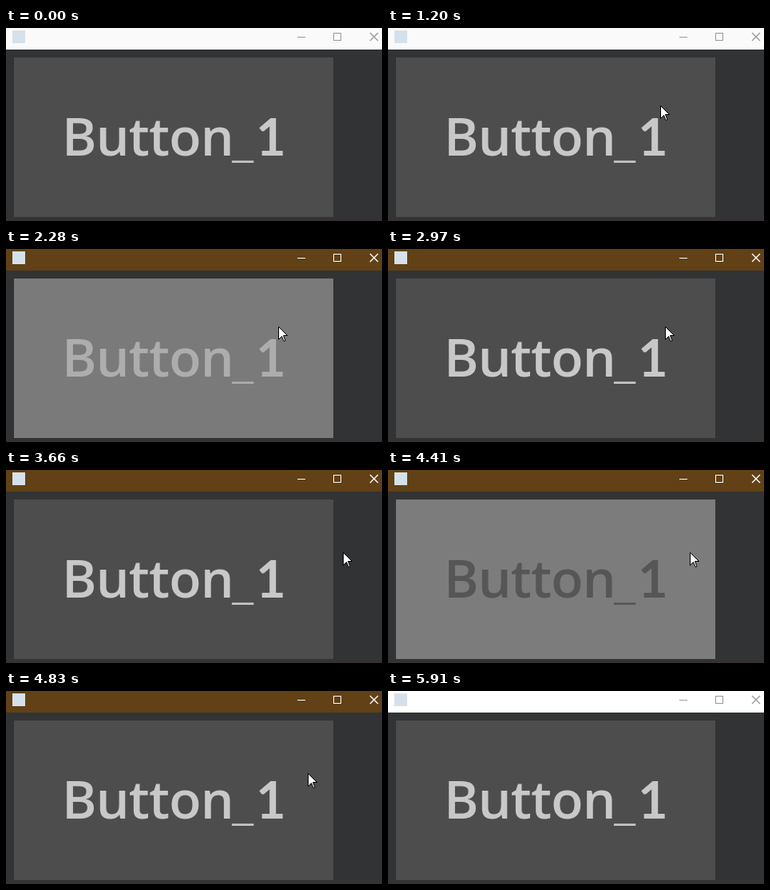
An HTML page with a canvas for the animation above (5.97 s loop, 471 by 242 pixels).

```html
<!DOCTYPE html>
<html>
<head>
<meta charset="utf-8">
<style>
  html, body { margin: 0; width: 100%; height: 100%; overflow: hidden; background: #323335; }
  canvas { display: block; }
</style>
</head>
<body>
<canvas id="stage" width="471" height="242"></canvas>
<script>
const ctx = document.getElementById('stage').getContext('2d');
const LOOP = 5970, STEP = 30;
const NORMAL = { back: 77, text: 200 };
const PRESSED = { back: 127, text: 77 };

// Progress per step towards the pressed look, and back from it
const PRESS = { back: [.6, .8, .93, 1], text: [.49, .76, .93, 1] };
const RELEASE = { back: [1, .96, .9, 0], text: [.74, .48, .22, 0] };
const FADES = [[1830, PRESS], [2220, RELEASE], [4350, PRESS], [4740, RELEASE]];

const linear = p => p;
const easeOut = p => 1 - (1 - p) ** 2;
const smooth = p => p * p * (3 - 2 * p);
const early = p => Math.min(1, p * 2.6);

// Pointer moves: start, steps, from, to, easing of x and y
const MOVES = [
  [570, 8, [465, 36], [342, 97], easeOut, easeOut],
  [1170, 1, [342, 97], [341, 97], linear, linear],
  [2940, 7, [341, 97], [453, 100], smooth, smooth],
  [3510, 13, [453, 100], [378, 103], p => p ** .92, early],
  [5280, 9, [378, 103], [474, 69], smooth, smooth]
];

const mix = (a, b, p) => a + (b - a) * p;

function shade(part, t) {
  let p = 0;
  for (const [start, fade] of FADES)
    if (t >= start) p = fade[part][Math.min(3, Math.floor((t - start) / STEP))];
  const v = Math.round(mix(NORMAL[part], PRESSED[part], p));
  return `rgb(${v},${v},${v})`;
}

function pointerAt(t) {
  let pos = null;
  for (const [start, steps, from, to, ex, ey] of MOVES) {
    if (t < start + STEP) break;
    const p = Math.min(1, Math.floor((t - start) / STEP) / steps);
    pos = [mix(from[0], to[0], ex(p)), mix(from[1], to[1], ey(p))].map(Math.round);
  }
  return pos;
}

function rect(color, x, y, w, h) {
  ctx.fillStyle = color;
  ctx.fillRect(x, y, w, h);
}

function drawTitleBar(t) {
  const active = t >= 1830 && t < 5910;
  rect(active ? '#614115' : t < 1830 ? '#fafafa' : '#fff', 0, 0, 471, 27);
  rect('#d5e1ea', 8, 3, 16, 16);
  const ink = active ? '#fff' : '#999';
  rect(ink, 365, 11, 10, 1);
  ctx.strokeStyle = ink;
  ctx.lineWidth = 1;
  ctx.strokeRect(410.5, 6.5, 9, 9);
  ctx.lineWidth = 1.4;
  ctx.beginPath();
  ctx.moveTo(456, 6);
  ctx.lineTo(466, 16);
  ctx.moveTo(466, 6);
  ctx.lineTo(456, 16);
  ctx.stroke();
}

function drawButton(t) {
  rect(shade('back', t), 10, 37, 400, 200);
  ctx.fillStyle = shade('text', t);
  const write = (font, text, x, spacing = 0) => {
    ctx.font = font;
    ctx.letterSpacing = spacing + 'px';
    ctx.fillText(text, x, 160);
  };
  write('600 66px "Open Sans", sans-serif', 'Button', 70, -.8);
  write('300 66px "Open Sans", sans-serif', '_', 283);
  write('700 65px Lato, sans-serif', '1', 313);
}

function drawPointer([x, y]) {
  const arrow = [[.5, .5], [.5, 16.5], [4.5, 12.5], [7, 18.5], [9, 18], [6.5, 11.5], [11.5, 11.5]];
  ctx.beginPath();
  for (const [dx, dy] of arrow) ctx.lineTo(x + dx, y + dy);
  ctx.closePath();
  ctx.fillStyle = '#fff';
  ctx.fill();
  ctx.strokeStyle = '#000';
  ctx.lineWidth = 1;
  ctx.stroke();
}

function draw() {
  const t = performance.now() % LOOP;
  rect('#323335', 0, 0, 471, 242);
  rect('#3a2f33', 0, 241, 471, 1);
  drawTitleBar(t);
  drawButton(t);
  const pos = pointerAt(t);
  if (pos) drawPointer(pos);
  requestAnimationFrame(draw);
}
draw();
</script>
</body>
</html>
```
